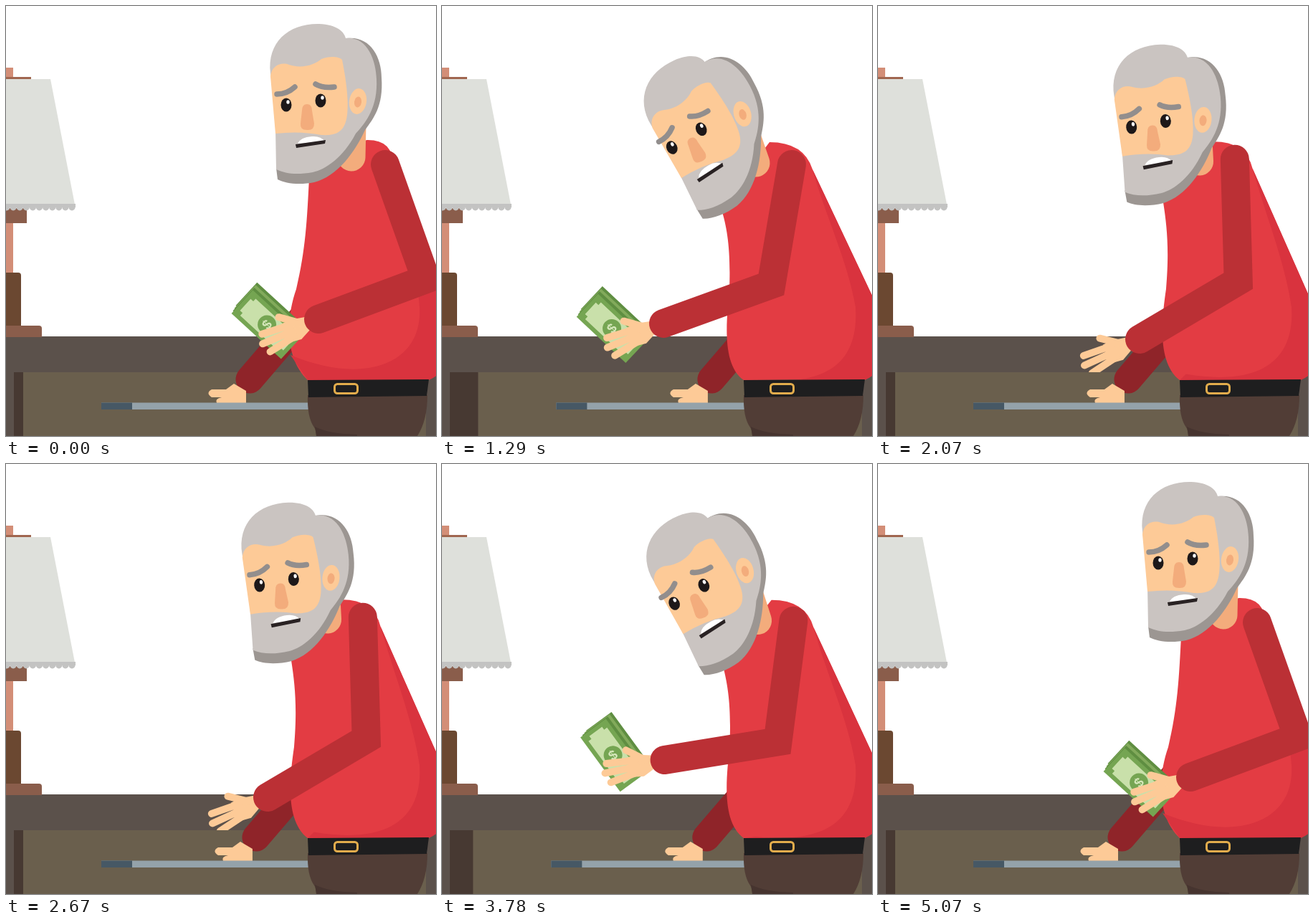
An HTML page with a canvas for the animation above (5.28 s loop, 600 by 600 pixels).

```html
<!DOCTYPE html>
<html lang="en">
<head>
<meta charset="utf-8">
<title>Saving in the drawer</title>
<style>
  html, body { margin: 0; height: 100%; overflow: hidden; background: #fff; }
  canvas { display: block; width: 100vw; height: 100vh; }
</style>
</head>
<body>
<canvas id="stage" width="600" height="600"></canvas>
<script>
const ctx = document.getElementById('stage').getContext('2d');
const LOOP = 5280, STEP = 30, LAST = 5070, GRAB = 3400, DROP = 1500;
const SKIN = '#fdca97', SKIN_DARK = '#f3ac7c', SLEEVE = '#bb3035', DESK = '#5b514b';

// Each pose: lean of the body (0 to 1), head tilt in degrees, wrist x and y
const REST = [0, 0, 436, 437];
const LIFT = [0.68, -25, 342, 389];
const PEAK = [0.59, -21, 320, 357];
const LOWER = [1, -25, 309, 443];
const DEEP = [1, -20, 368, 525];
const REACH = [0.98, -12, 367, 481];
const EMPTY = [0.76, -3, 365, 465];

const keys = [
  [0, REST], [450, LIFT], [600, PEAK], [1290, LOWER], [DROP, DEEP], [1710, REACH], [2010, EMPTY],
  [2730, EMPTY], [3210, REACH], [GRAB, DEEP], [3620, LOWER], [4290, PEAK], [4380, PEAK], [LAST, REST]
];

// Smooth curve through the keys that never overshoots
function slope(i, c) {
  if (i === 0 || i === keys.length - 1) return 0;
  const rate = j => (keys[j + 1][1][c] - keys[j][1][c]) / (keys[j + 1][0] - keys[j][0]);
  const a = rate(i - 1), b = rate(i);
  return a * b > 0 ? 2 * a * b / (a + b) : 0;
}

function poseAt(t) {
  let i = 0;
  while (i < keys.length - 2 && t >= keys[i + 1][0]) i++;
  const [t0, a] = keys[i], [t1, b] = keys[i + 1];
  const span = t1 - t0, u = (t - t0) / span, v = 1 - u;
  return a.map((p, c) =>
    v * v * (1 + 2 * u) * p + u * u * (3 - 2 * u) * b[c] +
    span * u * v * (v * slope(i, c) - u * slope(i + 1, c)));
}

// Two-bone arm: the elbow that joins shoulder and wrist
function elbow(sx, sy, wx, wy, upper = 170, lower = 160) {
  const d = Math.hypot(wx - sx, wy - sy), dx = (wx - sx) / d, dy = (wy - sy) / d;
  const along = (upper ** 2 - lower ** 2 + d * d) / (2 * d);
  const out = Math.sqrt(Math.max(0, upper ** 2 - along ** 2));
  return [sx + along * dx + out * dy, sy + along * dy - out * dx];
}

function fill(color, d) {
  ctx.fillStyle = color;
  ctx.fill(new Path2D(d));
}

function line(color, width, d) {
  ctx.strokeStyle = color;
  ctx.lineWidth = width;
  ctx.lineCap = 'round';
  ctx.stroke(new Path2D(d));
}

function box(color, x, y, w, h, r = 0) {
  ctx.fillStyle = color;
  ctx.beginPath();
  ctx.roundRect(x, y, w, h, r);
  ctx.fill();
}

function oval(color, x, y, rx, ry, turn = 0) {
  ctx.fillStyle = color;
  ctx.beginPath();
  ctx.ellipse(x, y, rx, ry, turn, 0, 7);
  ctx.fill();
}

function lamp() {
  box('#d38e77', 0, 86, 10, 14);
  box('#a0664f', 0, 99, 35, 4);
  box('#8a5d4b', 0, 282, 29, 21);
  box('#d38e77', 0, 303, 10, 70);
  box('#6b4831', 0, 372, 21, 75, [0, 4, 0, 0]);
  box('#8a5d4b', 0, 446, 50, 16, [0, 4, 0, 0]);
  for (let x = 1; x < 97; x += 9.1) oval('#c3c3c2', x, 280.5, 4.6, 5);
  fill('#dee0db', 'M0 102H62L96 277H0Z');
  box('#c3c3c2', 0, 276, 97, 5);
}

function desk(shift) {
  box(DESK, 0, 461, 600, 139);
  box('#473932', 11, 511, 575, 89);
  box('#6a5f4d', 24 + shift, 511, 562, 89);
  box(DESK, 586, 511, 14, 89);
}

function rearArm(x, shift) {
  line('#8f2429', 39, `M${x + 58} 521l90 -105`);
  fill(SKIN, `M${x + 5} 535H${x + 25}L${x + 36} 527L${x + 53} 537V554H${x + 12}
    Q${x + 9} 548 ${x + 19} 546H${x + 5}Q${x - 4} 540 ${x + 5} 535Z`);
  box('#94a2aa', 133 + shift, 553.5, 300 - shift, 9.5);
  box('#465865', 133 + shift, 553.5, 43, 9.5);
}

function body(lean) {
  const m = (a, b) => a + (b - a) * lean;
  const shoulder = `${m(540, 517)} ${m(222, 228)}`;
  const side = `602 ${m(400, 408)}`;
  fill('#e33c43', `M421 522C${m(388, 390)} ${m(490, 500)} ${m(391, 397)} ${m(435, 440)} ${m(405, 401)} 395
    C${m(418, 403)} 340 ${m(420, 398)} ${m(300, 310)} ${m(423, 390)} ${m(240, 284)}
    L${m(463, 425)} ${m(215, 232)}L${m(503, 457)} ${m(187, 190)}
    Q${m(540, 505)} ${m(186, 190)} ${shoulder}L${side}Q640 500 590 521Z`);
  fill('#d9333e', `M${shoulder}C${m(560, 534)} 290 ${m(572, 566)} 355 577 420
    C582 500 ${m(500, 535)} 530 ${m(397, 440)} ${m(487, 522)}L421 522H590Q640 500 ${side}Z`);
}

function trousers() {
  fill('#513d36', 'M421 543H588Q588 578 574 600H433Q433 592 430 588Q420 574 421 543Z');
  fill('#46342f', 'M431 587Q450 597 490 598V600H433Z');
  fill('#1e1e1f', 'M421 522L590 521L587 544L422 546Z');
  ctx.strokeStyle = '#e2ac4c';
  ctx.lineWidth = 3;
  ctx.beginPath();
  ctx.roundRect(458.5, 527.5, 32, 13, 4);
  ctx.stroke();
}

// The head turns about the cheek; the features slide forward as it tilts
function head(lean, tilt) {
  const slide = tilt * tilt / 62;
  const neckX = 482 - 44 * lean, neckY = 211 + 8 * lean;
  ctx.save();
  ctx.translate(432 - 46 * lean, 181 + 38 * lean);
  ctx.rotate(tilt * Math.PI / 180);
  ctx.translate(-432, -181);
  const nape = ctx.getTransform().transformPoint({ x: 483, y: 165 });
  ctx.restore();
  line(SKIN_DARK, 39, `M${nape.x} ${nape.y}L${neckX} ${neckY}`);

  ctx.save();
  ctx.translate(432 - 46 * lean, 181 + 38 * lean);
  ctx.rotate(tilt * Math.PI / 180);
  ctx.translate(-432, -181);
  fill('#9c9692', `M470 46C505 38 524 68 524 100C527 140 512 158 501 173C487 204 462 238 430 246
    C410 250 390 248 379 242L377 226Z`);
  fill('#cac4c1', `M369 94C364 50 395 24 437 25C462 26 472 36 474 45C504 42 516 75 517 102
    C519 140 503 162 488 178C470 212 446 228 428 232C405 236 390 234 377 228L376 170L372 120Z`);
  fill(SKIN, `M369 98C371 82 385 78 395 82C413 88 431 82 440 74C450 70 464 70 469 75
    C473 95 479 130 476 152C473 178 458 181 440 180Q410 174 376 178Z`);
  oval(SKIN, 491, 133, 12, 18, 0.15);
  oval(SKIN_DARK, 491, 134, 5, 7.5, 0.15);

  ctx.translate(-0.9 * slide, -0.4 * slide);
  fill(SKIN_DARK, 'M413 146Q413 137 420 137Q427 137 427 146L430 164Q430 174 420 173Q410 173 411 164Z');
  for (const [x, y] of [[391, 138], [439, 132]]) {
    oval('#1d1819', x, y, 7.5, 9.5);
    oval('#fff', x + 2.5, y - 4, 2.2, 2.8);
  }
  line('#928e8d', 7.5, 'M378 123Q392 123 403 113');
  line('#928e8d', 7.5, 'M432 109Q442 115 458 113');
  fill('#fff', 'M407 192Q411 183 427 182Q439 181 445 189Z');
  fill('#292223', 'M404 193L446 187L445 192L405 198Z');
  ctx.restore();
}

function money() {
  ctx.save();
  ctx.translate(-70, -18);
  ctx.rotate(63 * Math.PI / 180);
  for (let i = 3; i > 0; i--) {
    box(i % 2 ? '#5f8e41' : '#82aa5b', -47 - i, -22 - i * 4, 94, 44);
  }
  box('#75a552', -47, -22, 94, 44);
  fill('#c9e0aa', 'M-36 -16H36V-11H41V11H36V16H-36V11H-41V-11H-36Z');
  oval('#75a552', 0, 0, 13, 13);
  ctx.rotate(-Math.PI / 2);
  ctx.fillStyle = '#d5e7ba';
  ctx.font = 'bold 19px "Liberation Sans", sans-serif';
  ctx.textAlign = 'center';
  ctx.textBaseline = 'middle';
  ctx.fillText('$', 0, 1);
  ctx.restore();
}

function frontArm(lean, wx, wy, holding) {
  const sx = 529 - 41 * lean, sy = 221 - 40 * lean * (1 - lean);
  const [ex, ey] = elbow(sx, sy, wx, wy);
  ctx.save();
  // The drawer front hides whatever reaches below its upper edge
  ctx.beginPath();
  ctx.rect(0, 0, 600, 511);
  ctx.clip();
  ctx.save();
  ctx.translate(wx, wy);
  ctx.rotate(Math.atan2(ey - wy, ex - wx) + (holding ? 0 : 0.15));
  if (holding) money();
  line(SKIN, 18, 'M0 0H-28');
  fill(SKIN, 'M-15 -9L-36 -13L-50 -12L-52 16L-32 18L-15 9Z');
  line(SKIN, 10, 'M-26 -4L-51 -22M-40 -6L-81 -8M-40 3L-85 5M-40 11L-79 19');
  ctx.restore();
  line(SLEEVE, 40, `M${sx} ${sy}L${ex} ${ey}L${wx} ${wy}`);
  ctx.restore();
}

function draw(t) {
  const [lean, tilt, wx, wy] = poseAt(t);
  const shift = Math.max(0, lean - 0.78) * 120;
  const rear = 282 + 9.5 * lean * (2 - lean) + shift;
  ctx.fillStyle = '#fff';
  ctx.fillRect(0, 0, 600, 600);
  desk(shift);
  lamp();
  rearArm(rear, shift);
  body(lean);
  trousers();
  head(lean, tilt);
  frontArm(lean, wx, wy, t < DROP || t >= GRAB);
}

const start = performance.now();
function tick() {
  const t = (performance.now() - start) % LOOP;
  draw(Math.min(LAST, Math.floor(t / STEP) * STEP));
  requestAnimationFrame(tick);
}
tick();
</script>
</body>
</html>
```
